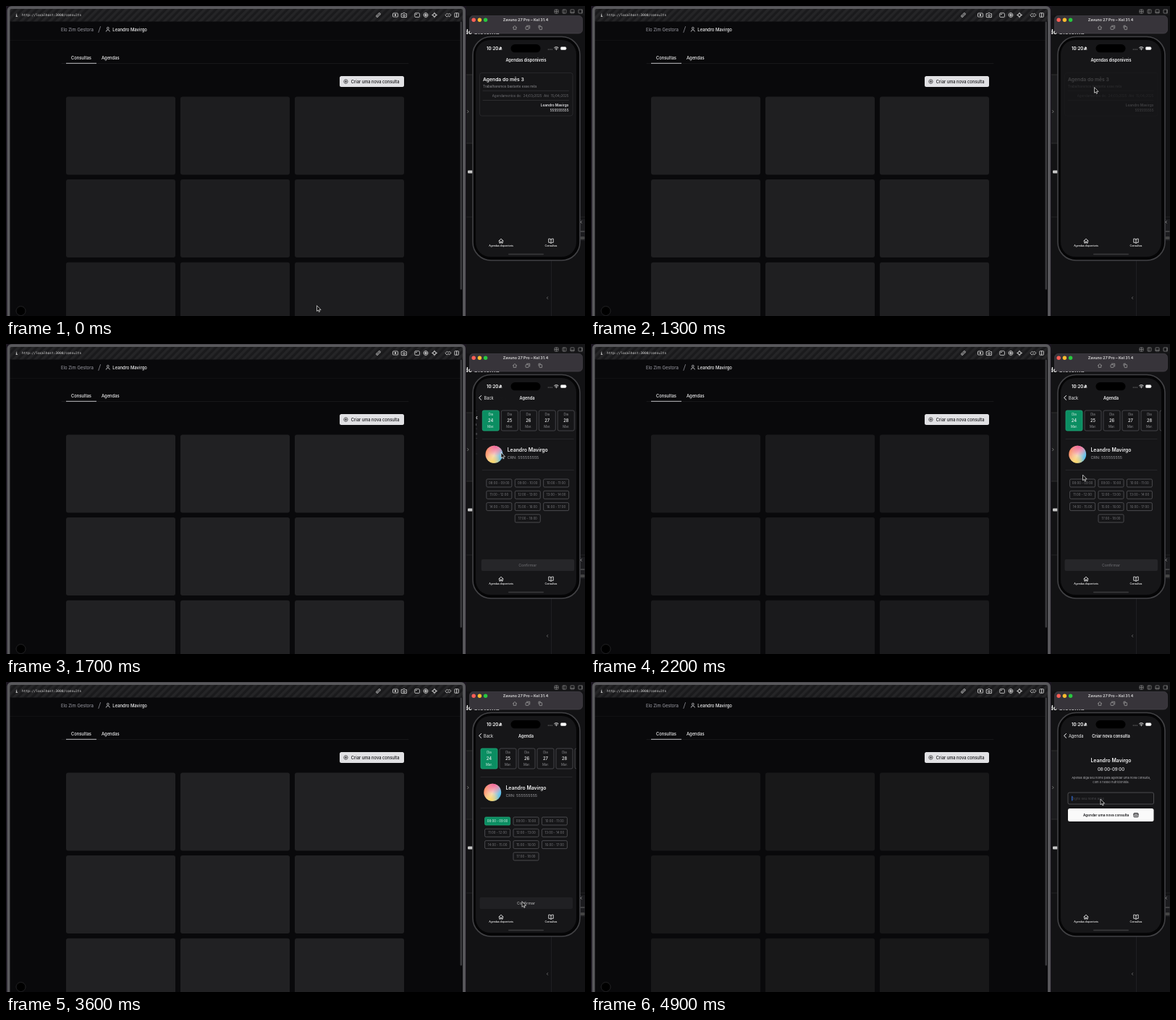
Recreate the animation shown at these times as an HTML page. Size 800 by 429 pixels, loop 5000 ms.

```html
<!DOCTYPE html>
<html lang="pt-BR">
<head>
<meta charset="utf-8">
<title>Consultas</title>
<style>
  html, body { margin: 0; width: 100%; height: 100%; overflow: hidden; background: #09090b; }
  svg { display: block; width: 800px; height: 429px; font-family: Inter, "Liberation Sans", sans-serif; }
  .mono { font-family: "DejaVu Sans Mono", monospace; }
</style>
</head>
<body>
<svg id="stage" viewBox="0 0 800 429"></svg>
<script>
const LOOP = 5000, STEP = 100, WIDTH = 139;
const PERSON = 'Leandro Mavirgo', CODE = '555555555';
const SCREEN = '#161618', GREEN = '#0b8e62';

const text = (x, y, s, size, fill = '#f4f4f5', weight = 400, anchor = 'start', more = '') =>
  `<text x="${x}" y="${y}" font-size="${size}" fill="${fill}" font-weight="${weight}" text-anchor="${anchor}" ${more}>${s}</text>`;
const mid = (y, s, size, fill, weight, x = 718.5) => text(x, y, s, size, fill, weight, 'middle');
const rect = (x, y, w, h, r, fill = 'none', stroke = 'none', sw = .8) =>
  `<rect x="${x}" y="${y}" width="${w}" height="${h}" rx="${r}" fill="${fill}" stroke="${stroke}" stroke-width="${sw}"/>`;
const circle = (x, y, r, fill = 'none', stroke = 'none', sw = .8) =>
  `<circle cx="${x}" cy="${y}" r="${r}" fill="${fill}" stroke="${stroke}" stroke-width="${sw}"/>`;
const path = (d, stroke = '#dcdcdc', sw = .8, fill = 'none') =>
  `<path d="${d}" fill="${fill}" stroke="${stroke}" stroke-width="${sw}" stroke-linecap="round" stroke-linejoin="round"/>`;
const group = (id, body, more = '') => `<g id="${id}" ${more}>${body}</g>`;
const times = (n, fn) => Array.from({ length: n }, (_, i) => fn(i)).join('');

const defs = `<defs>
  <pattern id="stripes" width="7" height="7" patternUnits="userSpaceOnUse" patternTransform="rotate(45)">
    <rect width="7" height="7" fill="#1a1a1c"/><rect width="3.5" height="7" fill="#252527"/>
  </pattern>
  <clipPath id="glass">${rect(649, 47, WIDTH, 300, 20, '#fff')}</clipPath>
  <linearGradient id="warm" x1="0" y1=".3" x2="1" y2=".7">
    <stop offset="0" stop-color="#ff8a5c"/><stop offset=".5" stop-color="#f6dccb"/><stop offset="1" stop-color="#45b9ee"/>
  </linearGradient>
  <radialGradient id="pink" cx=".6" cy="0" r=".6">
    <stop offset="0" stop-color="#f0609a"/><stop offset="1" stop-color="#f0609a" stop-opacity="0"/>
  </radialGradient>
  <radialGradient id="gold" cx=".4" cy="1" r=".55">
    <stop offset="0" stop-color="#ffd75e"/><stop offset="1" stop-color="#ffd75e" stop-opacity="0"/>
  </radialGradient>
</defs>`;

function toolbar() {
  return rect(4, 3, 628, 18.5, 3, 'url(#stripes)') +
    text(13, 14.6, 'i', 5.5, '#eee', 700, 'start', 'class="mono"') +
    text(22, 14.3, 'http://localhost:3000/consults', 4.55, '#e4e4e4', 400, 'start', 'class="mono"') +
    path('M513.4 13.6l2-2M513 11.9l-1 1a1.4 1.4 0 0 0 2 2l1-1M513.8 11.1l1-1a1.4 1.4 0 0 1 2 2l-1 1') +
    rect(534.5, 10, 7, 5, .6, 'none', '#dcdcdc') + circle(538, 12.5, 1.2, '#dcdcdc') +
    path('M546.6 10.6h1.5l.8-1h2.2l.8 1h1.5v5h-6.8z') + circle(550, 13, 1.3, 'none', '#dcdcdc') +
    rect(564.8, 9.8, 6.6, 5.6, .8, 'none', '#dcdcdc') + path('M566.2 11.6h1.2') +
    circle(580, 12.5, 2.9, 'none', '#dcdcdc') + circle(580, 12.5, 1.3, '#dcdcdc') + path('M577.3 12.5h5.4M580 9.8v5.4', '#dcdcdc', .5) +
    circle(592, 12.5, 2.3, 'none', '#dcdcdc') + path('M592 9v2M592 14v2M588.5 12.5h2M593.5 12.5h2') +
    path('M607.2 12.5l2.2-2.3 1.6 1.4 1.6-1.4 2.2 2.3-2.2 2.3-1.6-1.4-1.6 1.4z') +
    rect(619.8, 9.8, 5.6, 5.4, .5, 'none', '#dcdcdc') + path('M622.6 9.8v5.4');
}

function browser() {
  return rect(0, 0, 636, 429, 0, '#1b1620') + rect(3.5, 2, 629.5, 440, 4, '#09090b') + toolbar() +
    path('M5 47.5H628', '#131316') +
    text(76, 34.6, 'Elo Zim Gestora', 6, '#a1a1aa') + path('M130.5 28.5L127.8 36.5', '#a1a1aa', .7) +
    circle(140.8, 30.7, 1.4, 'none', '#e4e4e7', .7) + path('M138.3 35.2a2.5 2.2 0 0 1 5 0', '#e4e4e7', .7) +
    text(147.3, 34.6, PERSON, 5.9, '#f4f4f5', 500) +
    path('M77 79.5H556', '#1b1b1e') + path('M83.4 79.3H124.6', '#d4d4d8', .9) +
    text(90, 74.4, 'Consultas', 5.8, '#f4f4f5', 500) + text(132, 74.4, 'Agendas', 5.8, '#f4f4f5', 500) +
    rect(461, 97, 89, 15, 2.5, '#e1e1e4') +
    circle(469.5, 104.5, 2.7, 'none', '#27272a', .7) + path('M468 104.5h3M469.5 103v3', '#27272a', .7) +
    text(476.8, 106.6, 'Criar uma nova consulta', 5.75, '#18181b', 500) +
    group('cards', times(9, i => rect(83 + i % 3 * 158, 125.5 + Math.floor(i / 3) * 114.6, 151, 108, 3, '#fafafa'))) +
    circle(20.5, 422, 6.5, '#000', '#29292b') +
    rect(627.6, 21.5, 2.4, 371, 1, '#3c3c3f') +
    rect(3.5, 2.2, 629.5, 440, 4, 'none', '#59595c', 3.8);
}

function desktop() {
  return rect(634, 0, 166, 429, 0, '#121214') +
    rect(634, 0, 166, 13, 0, '#161618') + rect(634, 95, 14, 95, 0, '#1b1b1d') +
    path('M636 95h10M636 190h10', '#333') + path('M637.6 144.5l1.6 1.6-1.6 1.6', '#999', .7) +
    rect(638, 227.5, 7, 4, 1, '#c8c8c8') + path('M636 292h164M753.5 345V429', '#242427') +
    rect(791, 295, 9, 30, 0, '#1c1c1f') + path('M792.5 297.5l3 3M795.5 297.5l-3 3', '#aaa', .6) +
    path('M794 312h5', '#777') + rect(793.5, 319, 6, 4, 1, '#444') +
    path('M748.6 402.6l-1.3 1.4 1.3 1.4', '#999', .6) +
    times(4, i => rect(758 + i * 11, 5, 5, 5, .6, 'none', '#8b8b8b', .7)) +
    path('M760.5 5v5M758 7.5h5M771 5v5M780 8.5h5M796 5v5', '#8b8b8b', .7) +
    text(633, 39.2, 'do Sistema', 9, '#eee', 700);
}

function simulator() {
  const lights = ['#ff5f57', '#febc2e', '#28c840'];
  return rect(640.5, 13.5, 156, 24.5, 5, '#37343a', '#4a474d', .6) +
    times(3, i => circle(646.2 + i * 8.2, 19.3, 2.7, lights[i])) +
    mid(21.4, 'Zavuno 27 Pro – Kel 31.4', 5.3, '#dedede', 600, 718) +
    path('M700.4 29.8l2.6-2.4 2.6 2.4M701.2 29.4v3h3.6v-3', '#aaa', .7) +
    rect(718, 28.6, 4.2, 3.8, .6, 'none', '#aaa', .7) + path('M719.5 27.2h4.2v3.8', '#aaa', .7) +
    rect(737, 28.6, 3.6, 4, .5, 'none', '#aaa', .7) + path('M736 30v-2.8h2.6', '#aaa', .7) +
    rect(645, 42.5, 148, 309.5, 25, '#050506', '#424245', 1.6) + rect(649, 47, WIDTH, 300, 20, SCREEN);
}

function status() {
  return text(664, 61.2, '10:20', 6.1, '#fff', 600) +
    path('M681.3 60.3h4l-.7-1v-1.2a1.3 1.3 0 0 0-2.6 0v1.2z', '#fff', .5, '#fff') + path('M681 56.4l4.6 4.6', SCREEN, .6) +
    rect(697.5, 53, 41, 11.3, 5.6, '#000') +
    times(4, i => circle(749.2 + i * 1.8, 60, .5, '#999')) +
    path('M757.6 57.7a4 4 0 0 1 5.6 0M758.9 59.1a2.2 2.2 0 0 1 3 0', '#fff', .9) + circle(760.4, 60.4, .6, '#fff') +
    rect(766.3, 56.5, 7.6, 4.2, 1.3, '#fff') + rect(774.4, 57.8, .6, 1.6, .3, '#aaa') +
    path('M681 325l3-2.8 3 2.8M681.8 324.5v3.6h1.4v-2h1.6v2h1.4v-3.6', '#fff', .8) +
    mid(333, 'Agendas disponíveis', 3.4, '#fff', 500, 684) +
    path('M753 323v5.2M753 323c-.8-.8-2-.9-3.2-.9v5.2c1.200 0 2.400.1 3.200.9.8-.8 2-.9 3.200-.9v-5.200c-1.200 0-2.400.1-3.200.9', '#fff', .8) +
    mid(333, 'Consultas', 3.5, '#fff', 500, 753) +
    rect(694, 342.8, 49, 1.5, .7, '#3a3a3c');
}

const page = (id, body) => group(id, rect(649, 84, WIDTH, 231, 0, SCREEN) + body);

const agendas = () => page('page1', group('entry',
  rect(654.5, 92.5, 128.5, 59.5, 3, 'none', '#2b2b2e') +
  text(659, 104, 'Agenda do mês 3', 6.75, '#f4f4f5', 600) +
  text(659, 113.4, 'Trabalharemos bastante esse mês', 4.6, '#8d8d91') +
  path('M659 117.3H777.500M659 130.500H777.500', '#363639', .7) +
  text(777.5, 125.6, 'Agendamentos de:&#160; 24/03/2025&#160; Até&#160; 15/04/2025', 4.55, '#6c6c70', 400, 'end') +
  text(777.5, 139, PERSON, 4.75, '#e4e4e7', 600, 'end') + text(777.5, 146, CODE, 4.75, '#e4e4e7', 500, 'end')));

function chip(i) {
  const x = 718.5 + (i === 9 ? 0 : (i % 3 - 1) * 39.4), y = 187 + Math.floor(i / 3) * 16.3;
  const hour = n => String(n).padStart(2, '0') + ':00';
  return `<g id="chip${i}">` + rect(x - 17.5, y, 35, 11, 1.6, 'none', '#57575b') +
    mid(y + 7.1, `${hour(8 + i)} - ${hour(9 + i)}`, 4.3, '#77777b', 400, x) + '</g>';
}

function day(i) {
  const x = 656 + i * 26, on = i === 0, soft = on ? '#d9efe6' : '#8d8d91';
  return rect(x, 92, 23, 28, 2, on ? GREEN : 'none', on ? '#23a879' : '#505054') +
    mid(99.3, 'Dia', 4.4, soft, 400, x + 11.5) + mid(108, 24 + i, 5.8, '#f4f4f5', 500, x + 11.5) +
    mid(116, 'Mar.', 4.4, soft, 400, x + 11.5);
}

const agenda = () => page('page2',
  times(6, day) + path('M656 131.500H782M656 174.500H782', '#2b2b2e') +
  ['warm', 'pink', 'gold'].map(f => circle(672.2, 152.7, 12, `url(#${f})`)).join('') +
  text(690.4, 148.5, PERSON, 6.9, '#f4f4f5', 600) + text(690.4, 159, 'CRN: ' + CODE, 5.45, '#9b9b9f') +
  times(10, chip) +
  group('confirm', rect(654.5, 298, 128.5, 16, 2, '#262629') + mid(308, 'Confirmar', 5.2, '#66666a', 500)));

const booking = () => page('page3',
  mid(111, PERSON, 6.9, '#f4f4f5', 600) + mid(123.4, '08:00-09:00', 6, '#e4e4e7', 500) +
  mid(133.5, 'Apenas diga seu nome para agendar uma nova consulta,', 4.05, '#b4b4b8') +
  mid(139.6, 'com o nosso nutricionista.', 4.05, '#b4b4b8') +
  rect(659, 153, 118.5, 16, 2, 'none', '#58585c') +
  group('hint', text(664, 162.7, 'Digite seu nome aqui', 4.5, '#58585c')) +
  group('caret', path('M664.8 158.200V164', '#3478f6', 1)) +
  rect(659, 175, 118.5, 18, 2.5, '#fafafa') +
  text(680, 185.7, 'Agendar uma nova consulta', 4.7, '#18181b', 600) +
  rect(750, 181.5, 6, 5.4, .7, 'none', '#18181b', .9) + path('M750 183.100h6M751.500 185h3', '#18181b', .9));

const header = () =>
  group('chevron', path('M656.600 71.500l-3 2.900 3 2.900', '#f4f4f5', 1)) +
  group('back2', text(660, 76.7, 'Back', 5.6)) + group('back3', text(660, 76.7, 'Agenda', 5.6)) +
  ['Agendas disponíveis', 'Agenda', 'Criar nova consulta']
    .map((s, i) => group('title' + (i + 1), mid(76.6, s, 5.6, '#f4f4f5', 600))).join('');

const stage = document.getElementById('stage');
stage.innerHTML = defs + desktop() + browser() + simulator() +
  `<g clip-path="url(#glass)">${agendas() + agenda() + booking() + header() + status()}</g>` +
  group('pointer', path('M0 0V7.300L1.700 5.800 2.900 8.400 4.100 7.900 3 5.400H5.200Z', '#f2f2f2', .7, '#0a0a0a'));

const el = id => document.getElementById(id);
const clamp = v => Math.min(1, Math.max(0, v));
const move = (id, x, y = 0) => el(id).setAttribute('transform', `translate(${x} ${y})`);
const fade = (id, v) => el(id).setAttribute('opacity', v);
const paint = (id, tag, attr, v) => el(id).querySelector(tag).setAttribute(attr, v);

// Share of a screen push still to go, critically damped.
const push = ms => ms < 0 ? 1 : (1 + ms * .016) * Math.exp(-ms * .016);
// Opacity of an item held down from a to b.
const press = (t, a, b) => 1 - .8 * clamp(Math.min((t - a) / 100, 1 - (t - b) / 250));

const route = [
  [0, 429.5, 415], [100, 480, 372], [300, 658, 205], [500, 658, 205], [900, 704, 122],
  [1300, 695.5, 113], [1500, 688, 129], [1900, 680, 172], [2200, 679.5, 181.5], [2700, 686, 197.500],
  [3050, 686, 197.5], [3500, 713, 304], [3700, 713, 304], [4000, 713, 185.5], [4450, 704, 162.5], [5000, 704, 162.5]
];

function pointerAt(t) {
  const i = route.findIndex(p => p[0] > t), a = route[i - 1], b = route[i];
  const u = (t - a[0]) / (b[0] - a[0]), k = u * u * (3 - 2 * u);
  return [a[1] + (b[1] - a[1]) * k, a[2] + (b[2] - a[2]) * k];
}

function draw(t) {
  const r1 = push(t - 1320), r2 = push(t - 3700);
  fade('cards', .075 + .025 * Math.cos((t - 1620) / 1000 * Math.PI));

  move('page1', -.3 * WIDTH * (1 - r1));
  move('page2', WIDTH * (r1 - .3 * (1 - r2)));
  move('page3', WIDTH * r2);
  move('title1', -.4 * WIDTH * (1 - r1));
  move('title2', WIDTH * (.65 * r1 - .4 * (1 - r2)));
  move('title3', WIDTH * .65 * r2);
  move('back2', WIDTH * .27 * r1);
  move('back3', WIDTH * .2 * r2);
  fade('title1', r1 ** 1.5);
  fade('title2', (1 - r1) * r2 ** 1.5);
  fade('title3', 1 - r2);
  fade('back2', (1 - r1) * r2 ** 1.5);
  fade('back3', 1 - r2);
  fade('chevron', 1 - r1);

  const chosen = t >= 2970;
  fade('entry', press(t, 1170, 1330));
  fade('chip0', press(t, 2820, 2970));
  paint('chip0', 'rect', 'fill', chosen ? GREEN : 'none');
  paint('chip0', 'rect', 'stroke', chosen ? '#23a879' : '#57575b');
  paint('chip0', 'text', 'fill', chosen ? '#e6f5ef' : '#77777b');
  paint('confirm', 'text', 'fill', t >= 3100 ? '#f4f4f5' : '#66666a');
  fade('confirm', press(t, 3560, 3680));

  const focus = t >= 4700;
  fade('caret', focus ? 1 : 0);
  fade('hint', focus ? .75 : 1);
  move('pointer', ...pointerAt(t));
}

const start = performance.now();
function tick() {
  const t = (performance.now() - start) % LOOP;
  draw(Math.floor(t / STEP) * STEP);
  requestAnimationFrame(tick);
}
tick();
</script>
</body>
</html>
```
